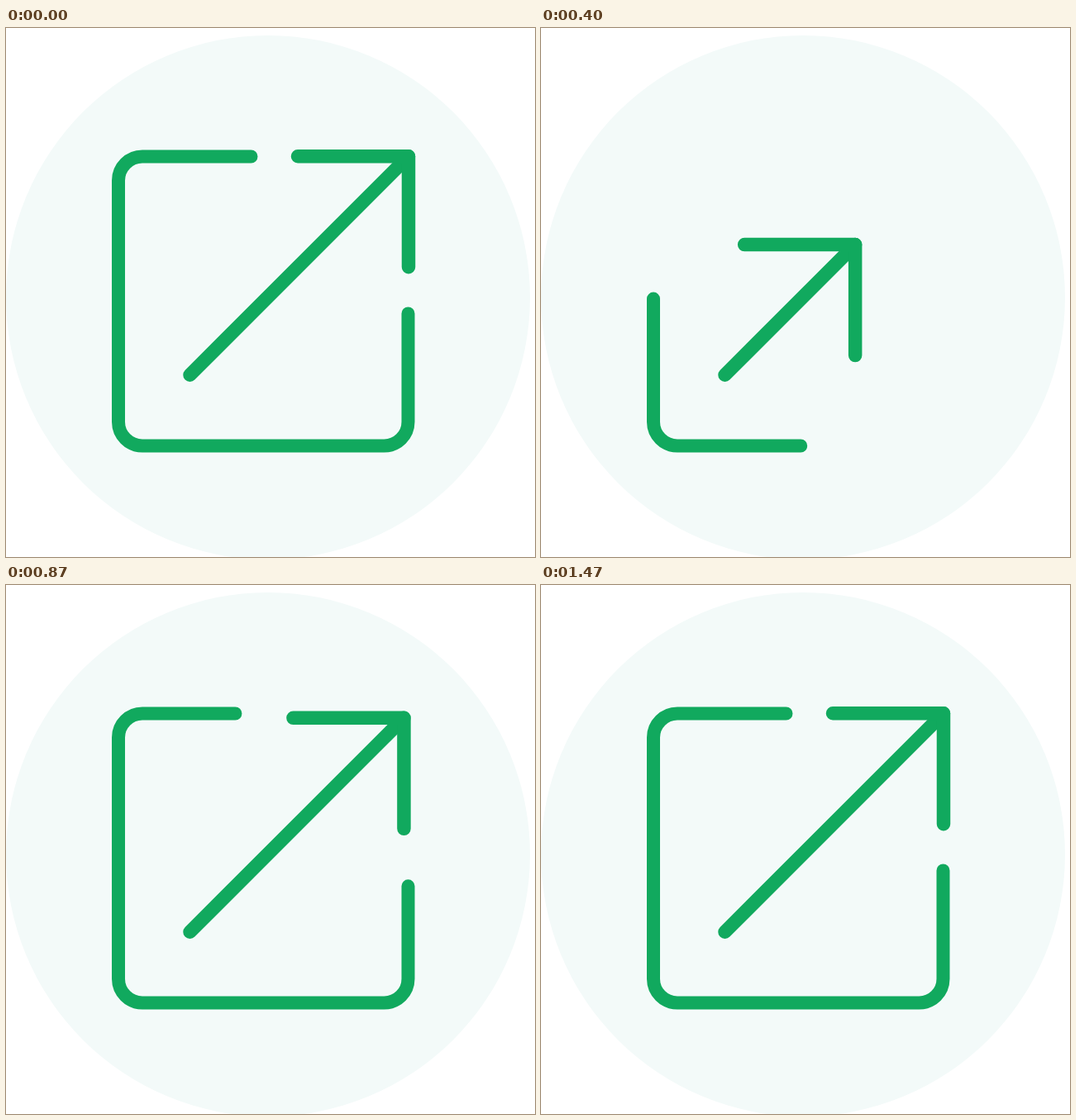
An HTML page that plays this animation: 640 px wide and 640 px high, repeating every 2 s.

```html
<!DOCTYPE html>
<html lang="en">
<head>
<meta charset="utf-8">
<title>Open link icon</title>
<style>
  html, body { margin: 0; width: 100%; height: 100%; overflow: hidden; background: #fff; }
  svg { display: block; width: 640px; height: 640px; }
  path { fill: none; stroke: #11a95e; stroke-width: 16; stroke-linecap: round; stroke-linejoin: round; }
  .arrow { stroke-width: 16.5; }
</style>
</head>
<body>
<svg viewBox="0 0 640 640">
  <circle cx="317" cy="326" r="317" fill="#f3faf9"/>
  <path id="box" d="M296.5 155.5H165A29 29 0 0 0 136 184.5V476.5A29 29 0 0 0 165 505.5H457.5A29 29 0 0 0 486.5 476.5V345.5"/>
  <path id="shaft" class="arrow"/>
  <path id="head" class="arrow" d="M353 155.25H487V289.25"/>
</svg>
<script>
const FPS = 30, FRAMES = 60;
const [box, shaft, head] = ['box', 'shaft', 'head'].map(id => document.getElementById(id));
const length = box.getTotalLength();

// [frame, arrow offset, trim at each end of the box]
const keys = [
  [0, 0, 0],
  [17, 139.5, 422.5],
  [27, 0, 0],
  [33, 71, 173],
  [39, 9.4, 0],
  [44, 0, 0],
  [FRAMES, 0, 0]
];

// Symmetric ease: cubic-bezier(a, 0, 1 - a, 1)
function ease(u, a) {
  let lo = 0, hi = 1;
  for (let i = 0; i < 24; i++) {
    const s = (lo + hi) / 2, r = 1 - s;
    const x = 3 * r * r * s * a + 3 * r * s * s * (1 - a) + s ** 3;
    if (x < u) lo = s; else hi = s;
  }
  return lo * lo * (3 - 2 * lo);
}

function valueAt(frame, column, softness) {
  const next = keys.findIndex(key => key[0] > frame);
  const from = keys[next - 1], to = keys[next];
  const u = (frame - from[0]) / (to[0] - from[0]);
  return from[column] + (to[column] - from[column]) * ease(u, softness);
}

function draw(now) {
  const frame = Math.floor(now * FPS / 1000 + 0.15) % FRAMES;
  const offset = valueAt(frame, 1, 0.25);
  const trim = valueAt(frame, 2, 0.22);
  head.setAttribute('transform', `translate(${-offset} ${offset})`);
  shaft.setAttribute('d', `M222.5 419.75L${487 - offset} ${155.25 + offset}`);
  box.style.strokeDasharray = `${length - 2 * trim} ${length}`;
  box.style.strokeDashoffset = -trim;
}

function tick() {
  draw(performance.now());
  requestAnimationFrame(tick);
}
tick();
</script>
</body>
</html>
```
